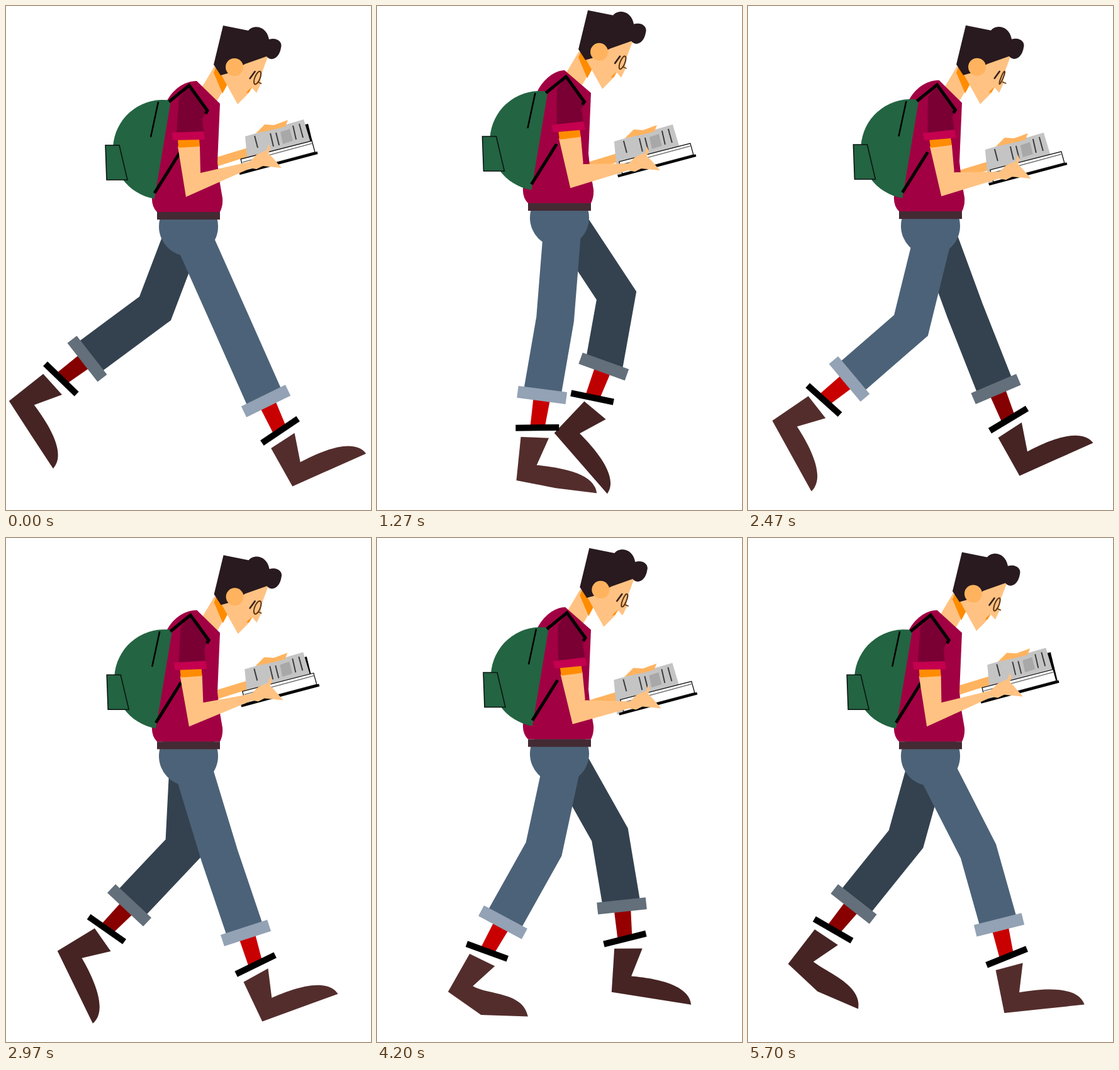
Animation of 580x800 px, one loop 5.73 s. Source, as an HTML page:

```html
<!DOCTYPE html>
<html lang="en">
<head>
<meta charset="utf-8">
<title>Walking reader</title>
<style>
  html, body { margin: 0; width: 100%; height: 100%; overflow: hidden; background: #fff; }
  svg { display: block; width: 580px; height: 800px; }
</style>
</head>
<body>
<svg viewBox="0 0 580 800" fill="none">
  <g id="farLeg"></g>
  <g class="bob">
    <path id="farArm" fill="#ffb35f" d="M325 243L381 226L400 222L400 234L325 258Z"/>
  </g>
  <g class="bob"><circle cx="290" cy="350" r="47" fill="#4c6278"/></g>
  <g id="nearLeg"></g>

  <g id="head">
    <path fill="#ffc282" d="M331 96L306 138L330 160L345 134L352 112Z"/>
    <path fill="#ff8c00" d="M334 96L330 106L344 139L353 122Z"/>
    <path fill="#ffc282" d="M342 109L352 90L417 78L404 113L405 123L398 138L391 130L386 138L368 156Z"/>
    <path fill="#ff8c00" d="M390 129L381 138L386 137Z"/>
    <path fill="#281a1e" d="M345 31L385 39C393 29 414 31 418 53C430 49 440 57 437 66C435 81 423 90 414 80L380 92L352 107L341 110L330 93Z"/>
    <circle cx="363" cy="97" r="14" fill="#ffb35f"/>
    <g id="face" stroke-linecap="round">
      <path stroke="#35201d" stroke-width="2.6" d="M387 115L395 104"/>
      <ellipse id="lens" cx="399" cy="114" ry="11" transform="rotate(22 399 114)" stroke="#5b3312" stroke-width="2"/>
      <path stroke="#5b3312" stroke-width="1.6" d="M400 121L405 123"/>
    </g>
  </g>

  <g class="bob">
    <path id="shirt" fill="#a10043"/>
    <rect x="240" y="327" width="100" height="12" fill="#432a33"/>
    <g class="sway">
      <path fill="#236442" d="M262 150A78.63 78.63 0 1 0 236 306Z"/>
      <path fill="#236442" stroke="#0a1410" stroke-width="1.6" d="M158 221H180L193 276H160Z"/>
      <path stroke="#000" stroke-width="2.5" d="M242 152L230 208"/>
      <path stroke="#000" stroke-width="5" d="M236 297L276 233"/>
    </g>

    <path id="backCover" fill="#000" d="M468 190L480 187L491 232L470 232Z"/>
    <g id="pages">
      <path fill="#c4c4c4" d="M380 207L473 180L488 230L385 262Z"/>
      <path fill="#a8a8a8" d="M436 200L451 195L456 214L440 219Z"/>
      <path stroke="#3c3c3c" stroke-width="2" d="M395 206L400 225M420 202L425 223M429 201L434 221M456 190L461 212M466 187L472 209"/>
      <path fill="#ffb35f" d="M397 202L411 188L426 189L448 181L444 191L430 195Z"/>
    </g>
    <g id="block">
      <path stroke="#000" stroke-width="4" d="M371 266L495 233"/>
      <path fill="#fff" stroke="#111" stroke-width="1.3" d="M373 243L486 214L491 232L378 262Z"/>
      <path stroke="#777" stroke-width="1.6" d="M376 248L487 218"/>
    </g>
    <path id="foreArm" fill="#ffc282"/>
    <path id="hand" fill="#ffc282" d="M386 248L398 236L414 229L417 219L420 226L417 234L424 241L438 257L408 254L398 259L388 257Z"/>
    <g id="upperArm">
      <path fill="#ffc282" d="M273 223L308 222L309 265L286 303Z"/>
      <path fill="#ff8c00" d="M273 211H307L308 223L274 225Z"/>
      <path fill="#7a0034" d="M291 126L275 145L271 202H314L312 179L319 166Z"/>
      <path fill="#c4004f" d="M263 201L314 199L316 212L265 213Z"/>
    </g>
    <path class="sway" stroke="#000" stroke-width="5" d="M259 152L291 126L320 166L317 171"/>
  </g>
</svg>

<script>
const $ = id => document.getElementById(id);
const put = (el, name, value) => el.setAttribute(name, value);
const move = (el, x, y, extra = '') => put(el, 'transform', `translate(${x} ${y}) ${extra}`);

const LOOP = 5730, CYCLE = 24;
const BEATS = [0, 70, 100, 130, 170];   // pose changes inside each 200 ms

// Leg pose over one stride; all tracks share the key phases.
const KEYS = [0, 1, 2, 5, 6, 9, 10, 12, 13, 14, 17, 18, 21, 22];
const TRACKS = {
  kneeX: [358, 349, 339, 308, 293, 265, 255, 241, 259, 287, 362, 385, 374, 366],
  kneeY: [503, 503, 503, 500, 499, 494, 497, 499, 507, 510, 480, 475, 490, 497],
  cuffX: [413, 398, 381, 321, 293, 200, 172, 133, 161, 200, 319, 347, 393, 399],
  cuffY: [627, 627, 627, 627, 621, 610, 600, 579, 592, 602, 588, 587, 603, 614],
  cuffTurn: [-26, -23, -18, -7, -2, 28, 38, 52, 50, 43, 32, 31, -6, -14],
  bootTurn: [2, -1, -2, 1, 2, 7, 5, 5, 11, 21, 34, 35, 15, 8]
};

const wrap = (n, size) => ((n % size) + size) % size;
const wave = (phase, peak, period) => Math.cos(2 * Math.PI * (phase - peak) / period);

// Periodic cubic through the key poses.
function sample(values, phase) {
  const n = KEYS.length;
  const time = i => KEYS[wrap(i, n)] + CYCLE * Math.floor(i / n);
  const value = i => values[wrap(i, n)];
  const slope = i => (value(i + 1) - value(i - 1)) / (time(i + 1) - time(i - 1));
  let i = 0;
  while (time(i + 1) <= phase) i++;
  const h = time(i + 1) - time(i), u = (phase - time(i)) / h, v = 1 - u;
  return v * v * (1 + 2 * u) * value(i) + u * u * (1 + 2 * v) * value(i + 1)
    + h * u * v * (v * slope(i) - u * slope(i + 1));
}

// Boot outline from the heel; the toe bends and lengthens about the ball of the foot.
function bootPath(degrees) {
  const a = degrees * Math.PI / 180, ball = 64, stretch = 1 - degrees / 200;
  const bend = (x, y) => [
    ball + stretch * ((x - ball) * Math.cos(a) - y * Math.sin(a)),
    stretch * ((x - ball) * Math.sin(a) + y * Math.cos(a))
  ];
  return `M0 0L-6.5 -69L37.5 -76L27 -30C55 -32 ${bend(120, -34)} ${bend(128, 0)}L${ball} 0Z`;
}

function makeLeg(root, jeans, cuff, sock, boot) {
  root.innerHTML = `
    <path stroke="${jeans}" stroke-width="60" stroke-linejoin="miter"/>
    <g>
      <path fill="${sock}" d="M-13 0H14L11 52H-12Z"/>
      <rect x="-39" y="-9.5" width="78" height="19" fill="${cuff}"/>
      <rect x="-35" y="47.5" width="69" height="10" fill="#000" transform="rotate(-8 -1 53)"/>
      <path fill="${boot}"/>
    </g>`;
  const [limb, shin] = root.children;
  const [sockPath, , , bootShape] = shin.children;
  return { limb, shin, sockPath, bootShape };
}

const nearLeg = makeLeg($('nearLeg'), '#4c6278', '#93a2b4', '#c90000', '#532d2c');
const farLeg = makeLeg($('farLeg'), '#34424f', '#636f7a', '#850000', '#462424');

function poseLeg(leg, phase, hipX, hipY, dx, dy) {
  const at = name => sample(TRACKS[name], phase);
  const x = at('cuffX') + dx, y = at('cuffY') + dy;
  put(leg.limb, 'd', `M${hipX} ${hipY}L${at('kneeX') + dx} ${at('kneeY') + dy}L${x} ${y}`);
  move(leg.shin, x, y, `rotate(${at('cuffTurn')})`);
  move(leg.bootShape, 0, 98, `rotate(${at('bootTurn')}) translate(-20 43)`);
  put(leg.bootShape, 'd', bootPath(-33 * Math.exp(-(((phase - 9) / 1.4) ** 2))));
}

function pose(phase) {
  const bob = 7.5 * (wave(phase, 0, 12) - 1);
  const sway = wave(phase, 10, CYCLE) - wave(0, 10, CYCLE);
  const headX = 5.5 * (wave(phase, 1.2, 12) - wave(0, 1.2, 12));
  const headY = 12.5 * (wave(phase, 0.43, 12) - wave(0, 0.43, 12));

  poseLeg(nearLeg, phase, 295, 362 + bob, 0, 0);
  poseLeg(farLeg, wrap(phase + 12, CYCLE), 291, 338 + bob, -4, -19);
  const lit = Math.sin(Math.PI * phase / 12) ** 4;
  put(farLeg.sockPath, 'fill', `rgb(${Math.round(133 + 67 * lit)},0,0)`);

  document.querySelectorAll('.bob').forEach(el => move(el, 0, bob));
  document.querySelectorAll('.sway').forEach(el => move(el, 6 * sway, 0));

  move($('head'), headX, headY);
  const glance = 0.5 - 0.5 * wave(phase, 3, CYCLE);
  move($('face'), 4 * glance, 0);
  put($('lens'), 'rx', 4.5 - 3 * glance);

  const lift = 0.22 * bob, lean = headX * 0.5;
  put($('shirt'), 'd', `M255 ${152 + lift}C264 ${134 + lift} 282 ${119 + lift} ${303 + lean} ${119 + lift}
    L340 ${155 + lift}L336 248L339 276L344 305Q345 317 340 327H240Q231 318 232 303Z`);

  const pageY = 14 * sway, handX = 7.5 * sway, handY = 11.5 * sway;
  move($('farArm'), 0, pageY);
  move($('pages'), -2 * sway, pageY);
  move($('backCover'), -6 * sway, pageY);
  move($('block'), handX, handY);
  move($('hand'), handX, handY);
  move($('upperArm'), 6 * sway, 0, `rotate(${-2.43 * sway} 291 126)`);
  put($('foreArm'), 'd', `M${286 + 13.5 * sway} 303L${290 + 12 * sway} 262L${309 + 12 * sway} 265
    L${392 + handX} ${246 + handY}L${394 + handX} ${255 + handY}Z`);
}

const start = performance.now();
let shown = -1;
function frame() {
  const t = (performance.now() - start) % LOOP;
  const step = Math.floor(t / 200) * 5 + BEATS.filter(b => b <= t % 200).length - 1;
  if (step !== shown) pose((shown = step) % CYCLE);
  requestAnimationFrame(frame);
}
frame();
</script>
</body>
</html>
```
